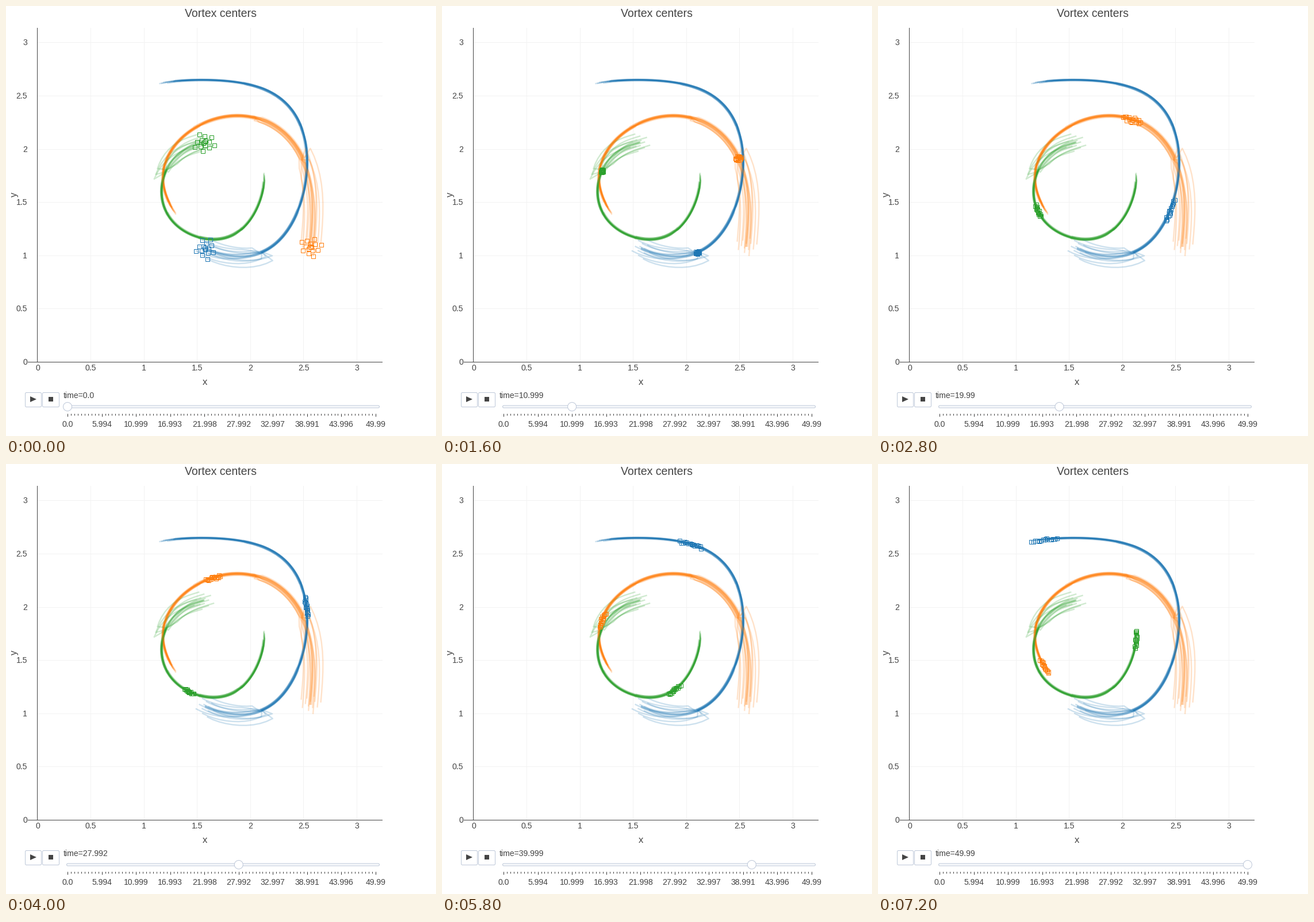
Write a matplotlib script that moves like this. It is 748 px wide and 748 px high and loops after 7400 ms.

```python
import math

import matplotlib.pyplot as plt
import numpy as np
from matplotlib.animation import FuncAnimation
from matplotlib.patches import Circle, FancyBboxPatch, Polygon, Rectangle

SIZE, DPI = 748, 64
PX = 72 / DPI  # points per pixel
FRAMES, INTERVAL = 37, 200
UNIT, X0, Y0 = 185.2, 54.4, 619
INK, BORDER, GRID = "#444444", "#bec8d9", "#f2f2f2"
RAIL_LEFT, RAIL_SPAN = 107, 536

# Saved times repeat with this period, eight slider steps at a time.
PERIOD = 10.999
CYCLE = [0.0, 1.998, 2.997, 4.995, 5.994, 7.002, 8.991, 9.99]

MEMBERS = 14
END = 52
TIMES = np.arange(51.0)

# Colour, key points x + iy of the mean path, phase of the start cloud, fan.
VORTICES = [
    ("#1f77b4", [346+421j, 368+430j, 433+432j, 508+355j,
                 510+202j, 406+133j, 300+130j, 262+136j], 1.6, 0),
    ("#ff7f0e", [529+419j, 532+380j, 521+279j, 441+197j,
                 327+213j, 274+287j, 286+346j, 297+365j], 0, 1.5),
    ("#2ca02c", [345+237j, 326+243j, 283+278j, 278+356j,
                 343+404j, 417+381j, 448+312j, 447+288j], 2.9, 0),
]


def fit_path(points):
    """Polynomial through key points at Chebyshev-spaced times."""
    s = -np.cos(np.linspace(0, np.pi, len(points)))
    return np.linalg.solve(np.vander(s), np.array(points))


def along(path, t):
    """Position and unit heading at times t, as complex numbers."""
    s = 2 * t / END - 1
    v = np.polyval(np.polyder(path), s)
    return np.polyval(path, s), v / np.abs(v)


def ensemble(path, phase, fan, rng):
    """Member tracks: a sheared cloud, then lags that regrow every 10 units."""
    seg = np.maximum(np.ceil(TIMES / 10).astype(int) - 1, 0)
    u = TIMES / 10 - seg
    lags = rng.permuted(np.tile(np.linspace(-1.3, 1.7, MEMBERS), (5, 1)),
                        axis=1)
    sides = np.clip(rng.normal(0, 1, (5, MEMBERS)), -1.6, 1.6)
    mean, heading = along(path, TIMES)
    tracks = []
    for j in range(MEMBERS):
        start = 19 * ((j + 1) / MEMBERS) ** 0.8 * np.exp(1j * (2.4 * j + phase))
        shear = 1.4 * heading * np.imag(start * np.conj(heading)) * u
        tau = np.clip(TIMES + lags[seg, j] * (0.12 + 0.88 * u), 0, END)
        late, turn = along(path, tau)
        width = 1.2 * (1 + fan / np.maximum(seg, 1) ** 2)
        late = late + 1j * turn * sides[seg, j] * width
        tracks.append(np.where(seg == 0, mean + start + shear, late))
    return mean, np.array(tracks)


fig = plt.figure(figsize=(SIZE / DPI, SIZE / DPI), dpi=DPI, facecolor="white")
ax = fig.add_axes([0, 0, 1, 1])
ax.set_xlim(0, SIZE)
ax.set_ylim(SIZE, 0)
ax.axis("off")


def line(x, y, color, width=1.0, z=1, **kw):
    return ax.plot(x, y, color=color, lw=width * PX, zorder=z, **kw)[0]


def trail(z, color, width, level, alpha):
    line(z.real, z.imag, color, width, level, alpha=alpha,
         solid_joinstyle="round", solid_capstyle="butt")


def marker(color, shape, size):
    return line([], [], color, z=8, ls="none", marker=shape, mfc="none",
                ms=size * PX, mew=PX)


def text(x, y, s, size=14, ha="center", **kw):
    kw.setdefault("va", "baseline")
    return ax.text(x, y, s, fontsize=size * PX, ha=ha, color=INK,
                   family="Liberation Sans", **kw)


def box(x, y, w, h, fill):
    ax.add_patch(FancyBboxPatch(
        (x, y), w, h, boxstyle="round,pad=0,rounding_size=2",
        fc=fill, ec=BORDER, lw=PX, zorder=5))


def clock(k):
    return str(round(PERIOD * (k // 8) + CYCLE[k % 8], 3))


def draw_axes():
    text(374, 18.5, "Vortex centers", 19.5)
    for n in range(7):
        x, y = X0 + n * UNIT / 2, Y0 - n * UNIT / 2
        label = f"{n / 2:g}"
        if n:
            line([x, x], [38, Y0], GRID)
            line([X0, 654], [y, y], GRID)
        text(x + 0.5, 633.5, label)
        text(37, y + 5, label, ha="right")
    line([X0, X0], [38, Y0], INK, z=2)
    line([38, 654], [Y0, Y0], INK, z=2)
    text(346, 659, "x", 16.5)
    text(14.5, 328, "y", 16.5, va="center", rotation=90)


def draw_controls():
    box(33.5, 672.5, 28, 25, "white")
    box(63.5, 672.5, 29, 25, "white")
    ax.add_patch(Polygon([(42, 679), (53, 684), (42, 689)],
                         fc=INK, ec="none", zorder=6))
    ax.add_patch(Rectangle((74, 680), 8, 8, fc=INK, ec="none", zorder=6))
    box(105.5, 695, 544, 4, "#f8fafc")
    for n in range(91):
        x = RAIL_LEFT + n * RAIL_SPAN / 90
        major = n % 10 == 0
        line([x, x], [708.5, 713.5 if major else 711.5], "#333333",
             solid_capstyle="butt")
        if major:
            text(x, 731.5, clock(n // 10 * 4))


draw_axes()
draw_controls()

rng = np.random.default_rng(12)
groups = []
for color, points, phase, fan in VORTICES:
    mean, tracks = ensemble(fit_path(points), phase, fan, rng)
    groups.append((color, mean, tracks,
                   marker(color, "s", 7), marker(color, "o", 9)))

# Interleave the colours so that overlapping trails blend.
for j in range(MEMBERS):
    for color, _, tracks, *_ in groups:
        trail(tracks[j], color, 2.4, 3, 0.22)
for color, mean, *_ in groups:
    trail(mean, color, 3, 4, 0.4)

grip = ax.add_patch(Circle((RAIL_LEFT, 697), 7.5, fc="white", ec=BORDER,
                           lw=PX, zorder=7))
status = text(99.5, 682, "", ha="left")


def update(k):
    sample = math.ceil(k * 1.375)
    for _, mean, tracks, squares, ring in groups:
        now = tracks[:, sample]
        squares.set_data(now.real, now.imag)
        ring.set_data([mean[sample].real], [mean[sample].imag])
    grip.center = (RAIL_LEFT + RAIL_SPAN * k / (FRAMES - 1), 697)
    status.set_text("time=" + clock(k))
    return []


anim = FuncAnimation(fig, update, frames=FRAMES, interval=INTERVAL,
                     repeat=True, repeat_delay=0, blit=False)
plt.show()
```
